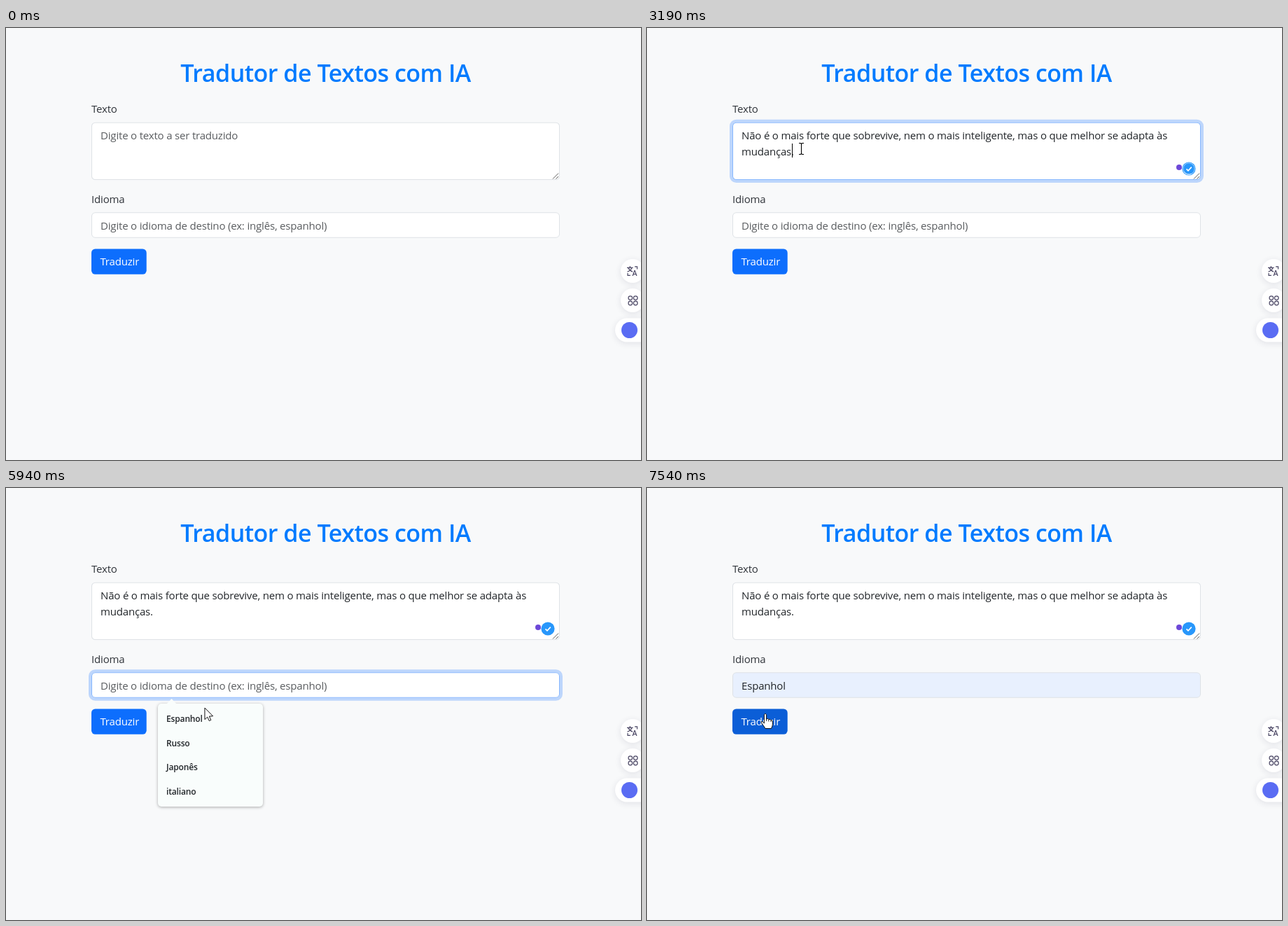
Recreate the animation shown at these times as an HTML page with a canvas. Size 907 by 617 pixels, loop 8000 ms.

```html
<!DOCTYPE html>
<html lang="pt-BR">
<head>
<meta charset="utf-8">
<title>Tradutor de Textos</title>
<style>
  html, body { margin: 0; width: 100%; height: 100%; overflow: hidden; background: #f8f9fa; }
  canvas { display: block; }
</style>
</head>
<body>
<canvas id="stage" width="907" height="617"></canvas>
<script>
const ctx = document.getElementById('stage').getContext('2d');
const LOOP = 8000;
const FAMILY = '"Open Sans", "Noto Sans", sans-serif';
const INK = '#212529', MUTED = '#595c5f', ICON = '#4a4664';

// Moments of the story, in ms
const AT = { enter: 110, focusText: 1700, paste: 2850, badge: 2930, focusLang: 5310,
             menu: 5420, preview: 6040, pick: 6350, close: 6470, hover: 6570, submit: 7260 };

// Pointer path: time, x, y
const PATH = [
  [110, 668, 478], [190, 646, 462], [260, 545, 386], [330, 522, 364], [400, 436, 330],
  [480, 363, 309], [560, 300, 268], [630, 257, 240], [700, 238, 214], [890, 220.5, 183],
  [1050, 220.5, 183], [1160, 220.5, 172.5], [3460, 220.5, 172.5], [3540, 226, 214],
  [3620, 248, 240], [3770, 262, 315], [4000, 283, 340], [4200, 289, 345], [4420, 289, 345],
  [4700, 290, 310], [5000, 289, 284], [5780, 288, 284], [5870, 287, 300], [5940, 284, 314],
  [6080, 275, 326], [6150, 271, 334], [6350, 271, 334], [6420, 258, 332], [6500, 212, 325],
  [6570, 179, 317], [6720, 172, 320], [7060, 169, 322]
];

const ARROW = new Path2D('M0 0V16.5L3.8 13L6.3 18.5L8.8 17.4L6.4 12L11.6 11.7Z');
const HAND = new Path2D('M-1.6 1.6Q0-1 1.6 1.6V8Q4 6.5 4.8 8.6Q7 7.5 8 9.8Q10 9.3 10.4 11V15' +
  'Q10.4 18 8.5 21.5H0Q-2 18-5.5 13.5Q-6.8 11-4.4 11.4L-1.6 14Z');

const ramp = (t, from, to) => Math.min(1, Math.max(0, (t - from) / (to - from)));
const ease = p => p * p * (3 - 2 * p);
const within = (x, y, l, t, r, b) => x >= l && x <= r && y >= t && y <= b;
const blink = (t, since) => Math.floor((t - since) / 535) % 2 === 0;

function mix(a, b, p) {
  return `rgb(${a.map((v, i) => Math.round(v + (b[i] - v) * p)).join(',')})`;
}

function text(str, x, y, color = INK, { size = 15, weight = 400, gap = -0.18, align = 'left' } = {}) {
  ctx.font = `${weight} ${size}px ${FAMILY}`;
  ctx.letterSpacing = gap + 'px';
  ctx.textAlign = align;
  ctx.fillStyle = color;
  ctx.fillText(str, x, y);
}

function box(x, y, w, h, r, fill) {
  ctx.beginPath();
  ctx.roundRect(x, y, w, h, r);
  ctx.fillStyle = fill;
  ctx.fill();
}

function disc(x, y, r, fill) {
  ctx.beginPath();
  ctx.arc(x, y, r, 0, 7);
  ctx.fillStyle = fill;
  ctx.fill();
}

function stroke(shape, color, width) {
  ctx.strokeStyle = color;
  ctx.lineWidth = width;
  ctx.stroke(new Path2D(shape));
}

function shadowed(blur, dy, color, draw) {
  ctx.save();
  ctx.shadowBlur = blur;
  ctx.shadowOffsetY = dy;
  ctx.shadowColor = color;
  draw();
  ctx.restore();
}

function field(y, h, focus, fill) {
  if (focus > 0) {
    const s = 4 * focus;
    ctx.beginPath();
    ctx.roundRect(122 - s, y - s, 669 + 2 * s, h + 2 * s, 5.5 + s);
    ctx.roundRect(122, y, 669, h, 5.5);
    ctx.fillStyle = `rgba(13,110,253,${0.25 * focus})`;
    ctx.fill('evenodd');
  }
  box(122, y, 669, h, 5.5, mix([222, 226, 230], [134, 183, 254], focus));
  box(123, y + 1, 667, h - 2, 4.5, fill);
}

function caret(x, y) {
  ctx.fillStyle = '#000';
  ctx.fillRect(x, y, 1, 20);
}

function badge(t) {
  disc(774, 201, 9.6, '#2897fb');
  if (t < AT.focusLang) {
    const turn = t / 160;
    ctx.beginPath();
    ctx.arc(774, 201, 8.2, 0, 7);
    ctx.strokeStyle = 'rgba(255,255,255,.55)';
    ctx.lineWidth = 1;
    ctx.stroke();
    ctx.beginPath();
    ctx.arc(774, 201, 8.2, turn, turn + 1.6);
    ctx.strokeStyle = '#e4f2ff';
    ctx.stroke();
  }
  stroke('M770.5 201.3L773 203.8L777.8 198.7', '#fff', 1.7);
}

function textArea(t) {
  const focus = ease(ramp(t, AT.focusText - 30, AT.focusText + 150)) *
    (1 - ease(ramp(t, AT.focusLang - 20, AT.focusLang + 150)));
  const active = t >= AT.focusText && t < AT.focusLang;
  const pasted = t >= AT.paste;
  field(134.7, 82.3, focus, '#fff');
  if (pasted) {
    text('Não é o mais forte que sobrevive, nem o mais inteligente, mas o que melhor se adapta às', 135, 159);
    text('mudanças.', 135, 182);
    if (active && blink(t, AT.paste)) caret(207, 165);
  } else {
    text('Digite o texto a ser traduzido', 135, 159, MUTED);
    if (active && blink(t, AT.focusText)) caret(134, 142);
  }
  stroke('M781 215.5L789 207.5M785.5 215.5L789 212', '#5c5c5c', 1);
  if (t >= AT.focusText + 60) disc(760, 199, 4, '#6d48d8');
  if (t >= AT.badge) badge(t);
}

function languageInput(t) {
  const focus = ease(ramp(t, AT.focusLang - 20, AT.focusLang + 150)) *
    (1 - ease(ramp(t, AT.submit - 20, AT.submit + 150)));
  const filled = t >= AT.preview;
  field(263.3, 36.4, focus, filled ? '#e8f0fe' : '#fff');
  if (filled) text('Espanhol', 135, 288);
  else text('Digite o idioma de destino (ex: inglês, espanhol)', 135, 288, MUTED);
  if (t >= AT.pick && t < AT.submit) {
    if (blink(t, AT.pick)) caret(195, 272);
  } else if (t >= AT.focusLang && t < AT.preview && blink(t, AT.focusLang)) {
    caret(134, 272);
  }
}

function suggestions(t) {
  const out = ramp(t, AT.close, 6640);
  const alpha = ramp(t, AT.menu, AT.menu + 140) * (1 - out) ** 2;
  if (alpha <= 0) return;
  const scale = 1 - 0.073 * out;
  ctx.save();
  ctx.globalAlpha = alpha;
  ctx.translate(292, 381.5);
  ctx.scale(scale, scale);
  ctx.translate(-292, -381.5);
  shadowed(4, 1, 'rgba(0,0,0,.32)', () => box(217, 308, 150, 147, 5, '#f9fdfc'));
  ctx.fillStyle = '#f9fdfc';
  ctx.fill(new Path2D('M229 309L236.5 301L244 309Z'));
  if (t >= AT.preview) {
    box(220, 313, 144, 34, 4, '#edf0f0');
    stroke('M342 326.2L349.6 333.8M349.6 326.2L342 333.8', '#45484a', 1.3);
  }
  ['Espanhol', 'Russo', 'Japonês', 'italiano'].forEach((name, i) =>
    text(name, 229, 334 + 34.6 * i, INK, { size: 12, weight: 600, gap: -0.15 }));
  ctx.restore();
}

function sideTools() {
  const soft = 'rgba(40,40,70,.11)';
  shadowed(10, 2, soft, () => disc(895, 347, 17, '#fff'));
  shadowed(10, 2, soft, () => disc(895, 389, 17, '#fff'));
  shadowed(10, 2, soft, () => box(870, 414.5, 60, 34, 17, '#fff'));
  stroke('M887 342.3H895.5M891.3 340V342M894 342.5Q892.3 346.3 887.5 348.3M888.8 342.5Q890.5 346.3 895 348.3' +
    'M898 340.8H901.5V344.5M888 350V353.3H891.8', ICON, 1.2);
  text('A', 898, 354, ICON, { size: 10.5, weight: 600, gap: 0, align: 'center' });
  for (const x of [891.8, 899.2])
    for (const y of [385.6, 393]) {
      ctx.beginPath();
      ctx.arc(x, y, 2.8, 0, 7);
      ctx.strokeStyle = ICON;
      ctx.lineWidth = 1.2;
      ctx.stroke();
    }
  disc(890.5, 431.5, 11.5, '#5a6cf3');
}

function pointerAt(t) {
  const i = PATH.findIndex(p => p[0] > t);
  if (i < 0) return PATH[PATH.length - 1].slice(1);
  const [t0, x0, y0] = PATH[i - 1], [t1, x1, y1] = PATH[i];
  const p = ramp(t, t0, t1);
  return [x0 + (x1 - x0) * p, y0 + (y1 - y0) * p];
}

function pointer(t) {
  if (t < AT.enter) return;
  const [x, y] = pointerAt(t);
  ctx.save();
  ctx.translate(x, y);
  if (within(x, y, 122, 135, 791, 217) || within(x, y, 122, 263, 791, 300)) {
    stroke('M0-7V7M-3.5-8H-1.2L0-7L1.2-8H3.5M-3.5 8H-1.2L0 7L1.2 8H3.5', '#000', 1.1);
  } else {
    const onButton = within(x, y, 122, 315, 201, 352);
    const shape = onButton ? HAND : ARROW;
    ctx.fillStyle = '#fff';
    ctx.fill(shape);
    ctx.lineJoin = 'round';
    ctx.lineWidth = 1;
    ctx.strokeStyle = '#111';
    ctx.stroke(shape);
    if (onButton) stroke('M1.6 8V11M4.8 8.6V11.5M8 9.8V12', '#111', 0.9);
  }
  ctx.restore();
}

function draw(t) {
  ctx.fillStyle = '#f8f9fa';
  ctx.fillRect(0, 0, 907, 617);
  text('Tradutor de Textos com IA', 456.5, 77, '#007bff', { size: 34, weight: 600, gap: -0.5, align: 'center' });
  text('Texto', 122, 121, '#30343a');
  text('Idioma', 122, 250, '#30343a');
  textArea(t);
  languageInput(t);
  box(122, 315.4, 78.7, 36.4, 5.5, mix([13, 110, 253], [11, 94, 215], ramp(t, AT.hover, AT.hover + 150)));
  text('Traduzir', 134.5, 339, '#fff');
  suggestions(t);
  sideTools();
  pointer(t);
}

const start = performance.now();
function tick() {
  draw((performance.now() - start) % LOOP);
  requestAnimationFrame(tick);
}
tick();
</script>
</body>
</html>
```
